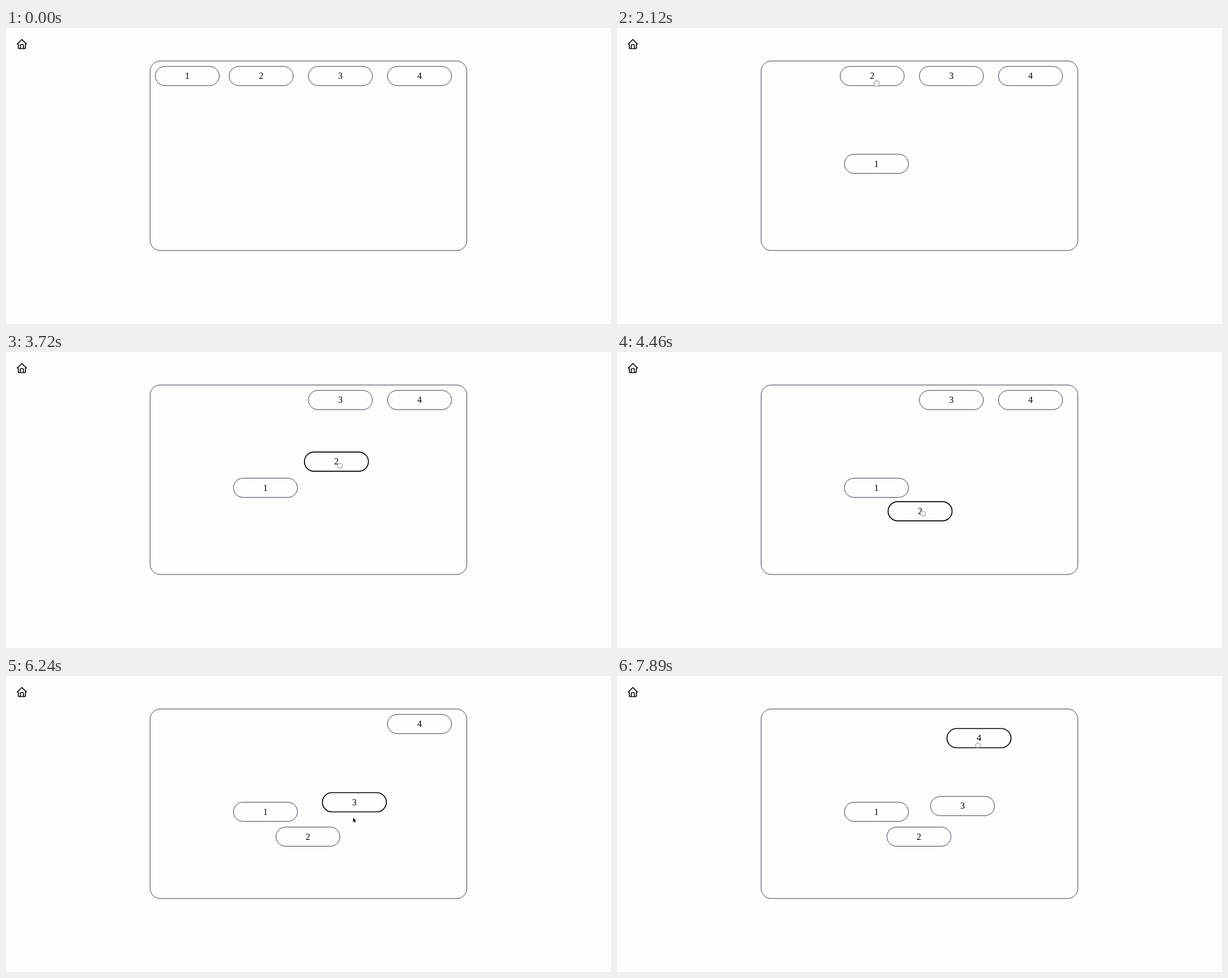
An HTML page that plays this animation: 1068 by 524 pixels, repeating every 7990 ms.

```html
<!DOCTYPE html>
<html lang="en">
<head>
<meta charset="utf-8">
<title>Draggable pills</title>
<style>
  html, body { margin: 0; width: 100%; height: 100%; overflow: hidden; background: #fdfdfc; }
  svg { display: block; }
  .box, .pill rect { fill: #fdfdfc; stroke: #302e3a; stroke-width: .95; }
  .pill.held rect { stroke: #000; stroke-width: 1.7; }
  text { font: 16px "Liberation Serif", "Times New Roman", serif; text-anchor: middle; }
  .home { fill: none; stroke: #000; stroke-width: 1.8; stroke-linecap: round; stroke-linejoin: round; }
  #cursor { fill: #fdfdfc; stroke: #666; stroke-width: .8; stroke-linejoin: round; }
  #cursor.arrow { fill: #000; stroke: none; }
</style>
</head>
<body>
<svg width="1068" height="524" viewBox="0 0 1068 524">
  <path class="home" transform="translate(17.2 17.6) scale(.9)"
    d="M5 12H3l9-9 9 9h-2M5 12v7a2 2 0 0 0 2 2h10a2 2 0 0 0 2-2v-7M9 21v-6a2 2 0 0 1 2-2h2a2 2 0 0 1 2 2v6"/>
  <rect class="box" x="254.4" y="58.4" width="559.1" height="335.5" rx="18"/>
  <g id="pills"></g>
  <path id="cursor"/>
</svg>
<script>
const LOOP = 7990, W = 113, H = 34, ROW = 85;

// reach: when the pointer sets off for the pill and when it arrives.
// keys: [ms, x, y] from grab to release; grip: pointer offset at both ends.
const pills = [
  { reach: [240, 580], grip: [[16, 0], [16, 0]],
    keys: [[900, 320, ROW], [1620, 458, 240.4], [1790, 458, 240.4]] },
  { reach: [1790, 2110], grip: [[8, 13], [5, 3]],
    keys: [[2190, 450.5, ROW], [2550, 626, 114], [3030, 572, 219.5],
      [3365, 626, 114], [4090, 539, 277], [4650, 533, 284.4]] },
  { reach: [4910, 5660], grip: [[1, 9], [-1, 46]],
    keys: [[5710, 590.3, ROW], [6240, 615, 223.5], [6560, 610, 230.2]] },
  { reach: [7220, 7500], grip: [[-2, 12.5], [-2, 12.5]],
    keys: [[7520, 730, ROW], [7890, 639, 110]] }
];

const shapes = {
  open: "M-3 5.2C-3.4 3.2-5 2-5.2.3C-5-.9-3.9-.6-3.2.6L-3.8-3.2C-3.6-4.5-2.4-4.3-2.1-3.2C-2.2-5.2-.2-5.4 0-4C.2-5.4 2-5.2 2.1-3.5C2.6-4.5 4.2-4.2 4.2-2.6C4.6-.4 4.2 2 3 5.2Z",
  fist: "M-3 4.2L-4.4 1C-4.6-.4-3.6-.8-3.4-1.2C-3.6-3.4-1.6-3.6-1-2.8C-.6-3.8.8-3.6 1-2.8C1.8-3.5 3-3 3.2-2.2C4.4-2.4 4.6-.6 4.2 1L3 4.2Z",
  arrow: "M-2-5V3L-.2 1.5 1 4.2 2.2 3.6 1 1H3.6Z"
};

const progress = (t, a, b) => Math.min(1, Math.max(0, (t - a) / (b - a)));
const smooth = u => u * u * (3 - 2 * u);
const mix = (a, b, u) => a.map((v, i) => v + (b[i] - v) * u);
const add = (a, b) => a.map((v, i) => v + b[i]);
const spot = key => key.slice(1);

function along(keys, t) {
  const i = Math.max(1, keys.findIndex(k => k[0] > t));
  if (t >= keys.at(-1)[0]) return spot(keys.at(-1));
  const [a, b] = [keys[i - 1], keys[i]];
  return mix(spot(a), spot(b), progress(t, a[0], b[0]));
}

const cursor = document.getElementById("cursor");
const layer = document.getElementById("pills");
let rest = [420, -10];

pills.forEach((pill, i) => {
  const g = document.createElementNS("http://www.w3.org/2000/svg", "g");
  g.innerHTML = `<rect x="${-W / 2}" y="${-H / 2}" width="${W}" height="${H}" rx="${H / 2}"/>
    <text y="5.2">${i + 1}</text>`;
  layer.append(g);
  pill.node = g;

  const first = pill.keys[0], last = pill.keys.at(-1);
  pill.grab = first[0];
  pill.drop = i < pills.length - 1 ? last[0] : LOOP;
  pill.leg = [rest, add(spot(first), pill.grip[0])];
  rest = add(spot(last), pill.grip[1]);
});

function pointerAt(t) {
  const pill = pills.findLast(p => t >= p.reach[0]) || pills[0];
  if (t < pill.grab) return mix(...pill.leg, smooth(progress(t, ...pill.reach)));
  return add(along(pill.keys, t), mix(...pill.grip, progress(t, pill.grab, pill.drop)));
}

function draw(t) {
  const [cx, cy] = pointerAt(t);
  let kind = "arrow";
  for (const { node, keys, grab, drop } of pills) {
    const [x, y] = along(keys, t);
    const held = t >= grab && t < drop;
    node.setAttribute("class", held ? "pill held" : "pill");
    node.setAttribute("transform", `translate(${x} ${y})`);
    if (Math.abs(cx - x) < W / 2 && Math.abs(cy - y) < H / 2) kind = held ? "fist" : "open";
  }
  cursor.setAttribute("class", kind);
  cursor.setAttribute("d", shapes[kind]);
  cursor.setAttribute("transform", `translate(${cx} ${cy})`);
  cursor.setAttribute("visibility", t < pills[0].reach[0] ? "hidden" : "visible");
}

const start = performance.now();
function tick() {
  draw((performance.now() - start) % LOOP);
  requestAnimationFrame(tick);
}
tick();
</script>
</body>
</html>
```
